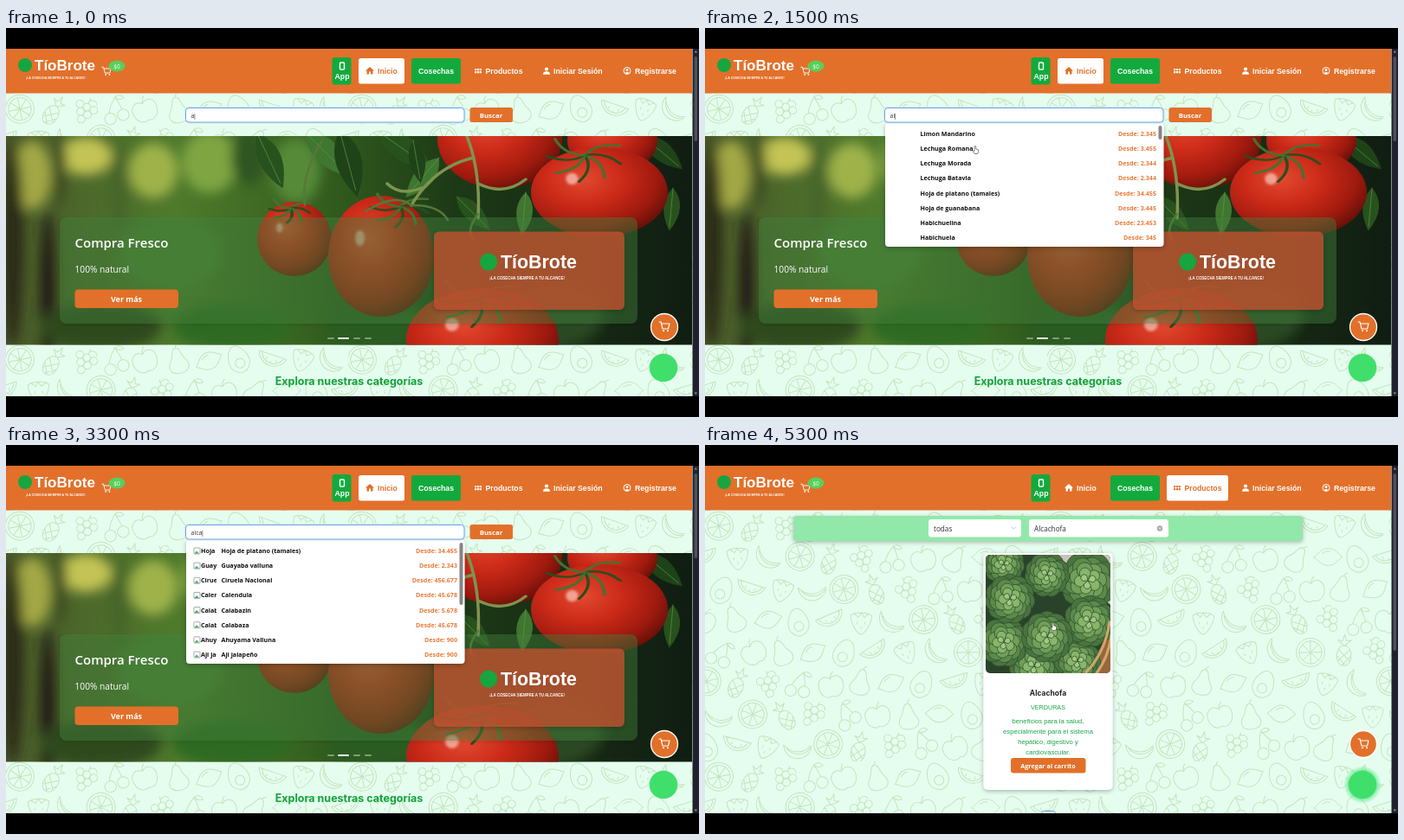
Animation, 800 px wide and 450 px high, one loop 5400 ms. Source, as an HTML page:

```html
<!DOCTYPE html>
<html lang="es">
<head>
<meta charset="utf-8">
<title>Tienda de frutas y verduras</title>
<style>
html, body { margin: 0; width: 100%; height: 100%; overflow: hidden; background: #000; }
svg { display: block; }
text { font-family: "Open Sans", "Noto Sans", sans-serif; white-space: pre; }
.b { font-weight: 700; }
.sb { font-weight: 600; }
.nav { font: 700 8.7px "Liberation Sans", Arial, sans-serif; }
.arial { font-family: "Liberation Sans", Arial, sans-serif; }
.head { font-family: Inter, sans-serif; font-weight: 700; }
.mid { text-anchor: middle; }
.end { text-anchor: end; }
.line { fill: none; stroke-linecap: round; stroke-linejoin: round; }
.pointer { animation: move 5.4s ease-in-out infinite; }
.glow { animation: glow 5.4s ease-in-out infinite; }
@keyframes move {
  0%, 72.2% { transform: translate(312px, 141px); }
  79.6%, 87% { transform: translate(364px, 128px); }
  96.3%, 100% { transform: translate(402px, 210px); }
}
@keyframes glow {
  0%, 29.6%, 59.3%, 88.9% { opacity: 0; }
  14.8%, 42%, 77%, 100% { opacity: 1; }
}
</style>
</head>
<body>
<svg width="800" height="450" viewBox="0 0 800 450">
  <defs>
    <linearGradient id="garden">
      <stop offset="0" stop-color="#4a5a2a"/><stop offset=".25" stop-color="#4f7a2c"/>
      <stop offset=".45" stop-color="#34601f"/><stop offset=".65" stop-color="#1d3a16"/>
      <stop offset="1" stop-color="#101d12"/>
    </linearGradient>
    <radialGradient id="red" cx=".38" cy=".35" r=".72">
      <stop offset="0" stop-color="#e2492f"/><stop offset=".4" stop-color="#cb2a18"/>
      <stop offset=".75" stop-color="#9f1a0e"/><stop offset="1" stop-color="#5c0f08"/>
    </radialGradient>
    <radialGradient id="halo">
      <stop offset=".7" stop-color="#4be67c" stop-opacity=".75"/>
      <stop offset="1" stop-color="#4be67c" stop-opacity="0"/>
    </radialGradient>
    <filter id="blur" x="-80%" y="-80%" width="260%" height="260%"><feGaussianBlur stdDeviation="7"/></filter>
    <filter id="soft" x="-50%" y="-50%" width="200%" height="200%"><feGaussianBlur stdDeviation="1.5"/></filter>
    <filter id="shade" x="-20%" y="-20%" width="140%" height="150%">
      <feDropShadow dx="0" dy="1.5" stdDeviation="2.5" flood-opacity=".28"/>
    </filter>
    <clipPath id="page"><rect y="24" width="800" height="402"/></clipPath>
    <clipPath id="hero"><rect y="125" width="792" height="241.500"/></clipPath>
    <clipPath id="alts"><rect x="216" y="112" width="27" height="140"/></clipPath>
    <clipPath id="cover"><rect x="324" y="127" width="144" height="137" rx="5"/></clipPath>
    <clipPath id="thumb"><rect x="216" y="116" width="27" height="18"/></clipPath>
  </defs>
</svg>
<script>
const LOOP = 5400;
const ORANGE = '#e2702a', GREEN = '#12aa3d';
const svg = document.querySelector('svg');
let css = '', count = 0;

const rect = (x, y, w, h, r, fill, more = '') =>
  `<rect x="${x}" y="${y}" width="${w}" height="${h}" rx="${r}" fill="${fill}" ${more}/>`;
const circle = (x, y, r, fill, more = '') =>
  `<circle cx="${x}" cy="${y}" r="${r}" fill="${fill}" ${more}/>`;
const oval = (x, y, rx, ry, fill, more = '') =>
  `<ellipse cx="${x}" cy="${y}" rx="${rx}" ry="${ry}" fill="${fill}" ${more}/>`;
const text = (x, y, s, size, fill, cls = '') =>
  `<text x="${x}" y="${y}" font-size="${size}" fill="${fill}" class="${cls}">${s}</text>`;
const line = (d, stroke, width = 1, more = '') =>
  `<path class="line" d="${d}" stroke="${stroke}" stroke-width="${width}" ${more}/>`;
const at = (x, y, body, more = '') => `<g transform="translate(${x} ${y}) ${more}">${body}</g>`;
const times = (n, fn) => Array.from({ length: n }, (_, i) => fn(i)).join('');

// Shows body only inside the given [from, to] spans of the loop, in ms.
function during(spans, body) {
  const id = 'w' + count++;
  const pct = ms => ms / LOOP * 100 + '%';
  css += `@keyframes ${id}{0%{opacity:0}${spans.map(([a, b]) =>
    `${pct(a)}{opacity:1}${pct(b)}{opacity:0}`).join('')}}`;
  return `<g style="animation:${id} ${LOOP}ms step-end infinite">${body}</g>`;
}

function random(seed) {
  return () => (seed = seed * 16807 % 2147483647) / 2147483647;
}

// Wallpaper of outlined fruit
const ring = (x, y, r) => `M${x - r} ${y}a${r} ${r} 0 1 0 ${2 * r} 0a${r} ${r} 0 1 0 ${-2 * r} 0`;
const fruits = [
  ring(0, 0, 15) + ring(0, 0, 12) + 'M-12 0H12M0-12V12M-8-8L8 8M8-8L-8 8',
  'M0-6C-6-12-14-7-13 2C-12 11-5 15 0 12C5 15 12 11 13 2C14-7 6-12 0-6ZM0-6q1-5 4-7',
  'M-15-6A15.5 15.5 0 0 0 15-6ZM-12-6A12.5 12.5 0 0 0 12-6M-5-2v2M0 1v2M5-2v2',
  'M0-5C10-5 10 16 0 16S-10-5 0-5ZM-6-1L6 11M6-1L-6 11M-7 6L1 15M7 6L-1 15M0-5L-7-11-2-10 0-17 2-10 7-11Z',
  'M0-13C5-13 4-5 7-1C14 8 9 14 0 14S-14 8-7-1C-4-5-5-13 0-13ZM0-13q1-3 3-4',
  'M-11-6C-11 3-4 13 0 14C4 13 11 3 11-6C6-10-6-10-11-6ZM-8-8L-3-4 0-9 3-4 8-8M-4 1v2M4 1v2M0 6v2',
  ring(-8, -4, 4) + ring(0, -4, 4) + ring(8, -4, 4) + ring(-4, 3, 4) + ring(4, 3, 4) + ring(0, 10, 4) + 'M0-8V-14M0-11q6-5 9 1',
  'M-15 0C-10-3-8-9 0-9S10-3 15 0C10 3 8 9 0 9S-10 3-15 0ZM-6-4q4-3 8-2',
  'M-12-9C-8 4 2 9 13 5C12 12-2 16-10 7C-14 2-14-4-12-9ZM-11-4C-8 6 2 12 12 7',
  ring(-6, 8, 6) + ring(8, 7, 6) + 'M-6 2Q-3-6 4-13Q7-5 8 1M4-13q6-3 9 3q-6 2-9-3',
  'M0-14C7-14 13 0 10 8Q6 15 0 15T-10 8C-13 0-7-14 0-14Z' + ring(0, 5, 5)
];
function wallpaper() {
  const w = 395, h = 290, cols = 11, rows = 8, rnd = random(41);
  const art = times(cols * rows, i => {
    const col = i % cols, row = Math.floor(i / cols);
    const x = (col + .5 + row % 2 / 2) * w / cols + rnd() * 4 - 2;
    const y = (row + .5) * h / rows + rnd() * 4 - 2;
    const d = fruits[(col * 3 + row * 5) % fruits.length];
    const turn = `rotate(${rnd() * 70 - 35}) scale(1.1)`;
    const one = px => at(px, y, `<path d="${d}"/>`, turn);
    return one(x) + (x > w - 20 ? one(x - w) : '');
  });
  return `<pattern id="fruit" width="${w}" height="${h}" patternUnits="userSpaceOnUse" y="76">
    <g class="line" stroke="#c4e3bc" stroke-width=".9">${art}</g></pattern>`;
}

// Icons, drawn around their own centre
const cart = (s, color) => line('M-6-5H-4L-2 3H4.500L6-3H-3.500', color, 1.1, `transform="scale(${s})"`) +
  circle(-1 * s, 5.2 * s, s, color) + circle(4 * s, 5.2 * s, s, color);
const icons = {
  home: c => `<path fill="${c}" d="M0-4.500L5 0H3.500V4H1V1H-1V4H-3.500V0H-5Z"/>`,
  grid: c => times(6, i => rect(-4 + i % 3 * 2.9, i < 3 ? -2.5 : .6, 2.2, 2.2, .4, c)),
  user: c => circle(0, -2, 2.1, c) + `<path fill="${c}" d="M-4 4.200Q-4 .8 0 .8T4 4.200Z"/>`,
  login: c => circle(0, 0, 4, 'none', `stroke="${c}"`) + circle(0, -1, 1.5, c) +
    `<path fill="${c}" d="M-2.500 2.600Q0 .2 2.500 2.600Q0 4.400-2.500 2.600Z"/>`
};

function brand(x, y, scale) {
  return at(x, y, circle(8, 10, 8, '#17a53f') +
    text(19, 16, 'TíoBrote', 17, '#fff', 'b arial') +
    text(9, 26, '¡LA COSECHA SIEMPRE A TU ALCANCE!', 3.500, '#fff', 'b arial'), `scale(${scale})`);
}

function header(active) {
  const item = (x, w, iconX, labelX, icon, label) => {
    const c = label === active ? ORANGE : '#fff';
    return (label === active ? rect(x, 35, w, 29.500, 2.500, '#fff') : '') +
      at(iconX, 49.500, icons[icon](c)) + text(labelX, 53, label, 8.7, c, 'nav');
  };
  return rect(0, 24, 792, 51.500, 0, ORANGE) + brand(14, 33, 1) +
    at(116, 49.500, cart(.85, '#fff')) + oval(128, 44, 9.500, 6.500, '#58cf5b') +
    text(128, 46.500, '$0', 6.500, '#fff', 'mid') +
    rect(376.500, 34, 22, 31.500, 3, GREEN) +
    rect(385.500, 40, 5, 8, 1, 'none', 'stroke="#fff" stroke-width="1.400"') +
    text(388, 58.500, 'App', 8.7, '#fff', 'nav mid') +
    rect(468, 35, 57, 29.500, 2.500, GREEN) + text(496.500, 53, 'Cosechas', 8.7, '#fff', 'nav mid') +
    item(407, 53, 420, 429, 'home', 'Inicio') + item(533, 71, 545, 553.500, 'grid', 'Productos') +
    item(612, 84, 624, 632, 'user', 'Iniciar Sesión') + item(704, 77, 717, 726, 'login', 'Registrarse');
}

// Hero picture
const leaf = (x, y, len, turn, fill) => at(x, y,
  `<path fill="${fill}" d="M0 0Q${len * .4} ${-len * .4} ${len} 0Q${len * .4} ${len * .35} 0 0Z"/>` +
  line(`M0 0H${len * .9}`, '#6b9a45', .6), `rotate(${turn})`);
const calyx = (x, y, len) => at(x, y, times(7, i =>
  line(`M0 0Q${len * .5} ${-len * .25} ${len} ${len * .15}`, i % 2 ? '#2b4d1e' : '#48702f', 3.500,
    `transform="scale(1 .7) rotate(${i * 40 - 30})"`)));
const tomato = (x, y, rx, ry, capX) => oval(x, y, rx, ry, 'url(#red)') +
  oval(x - rx * .4, y - ry * .3, rx * .09, ry * .13, '#ffe3d8', 'opacity=".6" filter="url(#soft)"') +
  calyx(capX, y - ry * .82, rx * .55);

function garden() {
  const spots = [
    [30, 170, 22, 40, '#a3a845'], [92, 148, 30, 22, '#c3c454'], [170, 165, 28, 32, '#9fb24a'],
    [235, 155, 32, 36, '#7fa543'], [8, 250, 12, 120, '#2a2a17'], [48, 300, 9, 90, '#241f13'],
    [62, 165, 8, 45, '#3c4d22'], [130, 185, 12, 50, '#47662a'], [280, 150, 20, 32, '#2f5420'],
    [110, 345, 70, 28, '#2f4a1e'], [190, 260, 60, 40, '#4c8032'], [260, 345, 70, 26, '#2f6a22'],
    [335, 165, 28, 38, '#568a38'], [430, 345, 60, 28, '#2c5c20'], [630, 330, 60, 40, '#2b4a20']
  ];
  const leaves = [
    [290, 122, 70, 65], [345, 120, 75, 45], [385, 118, 80, 75], [430, 120, 75, 35], [500, 150, 60, 130],
    [470, 130, 50, 80], [520, 195, 55, 45], [600, 190, 50, 95], [735, 125, 60, 40], [770, 185, 50, 95]
  ];
  return `<g clip-path="url(#hero)">` + rect(0, 125, 792, 242, 0, 'url(#garden)') +
    `<g filter="url(#blur)">${spots.map(s => oval(...s)).join('')}</g>` +
    leaves.map(([x, y, len, turn], i) => leaf(x, y, len, turn, ['#28521d', '#3f7630', '#1e4318'][i % 3])).join('') +
    tomato(570, 128, 72, 58, 560) + tomato(700, 130, 52, 38, 700) + tomato(685, 190, 79, 52, 668) +
    tomato(333, 244, 43, 43, 328) + tomato(550, 361, 88, 60, 545) + tomato(433, 264, 61, 70, 455) +
    line('M532 125Q548 165 545 220M540 150Q495 160 468 205M545 180Q575 195 600 175M480 185Q455 195 440 180', '#7d9450', 3.500) +
    line('M468 205Q450 190 415 212M470 205Q500 205 510 222M545 215Q530 235 540 245M345 205Q340 170 365 130', '#56783a', 2.500) + '</g>';
}

function hero() {
  return garden() +
    rect(62, 219, 667, 123, 8, 'rgba(72,132,62,.4)', 'filter="url(#shade)"') +
    rect(494, 235.500, 220, 90.500, 6, 'rgba(190,82,48,.8)', 'filter="url(#shade)"') +
    brand(547, 258, 1.26) +
    text(79.500, 254, 'Compra Fresco', 15, '#fff', 'sb') +
    text(79.500, 283, '100% natural', 10.2, '#fff') +
    rect(79.500, 302.500, 119.500, 21.500, 4, ORANGE) + text(139, 316.500, 'Ver más', 9, '#fff', 'b mid') +
    [371, 401, 414].map(x => rect(x, 358, 8, 2, 1, '#fff', 'opacity=".4"')).join('') +
    rect(383, 358, 13, 2, 1, '#fff');
}

// Search box and its suggestions
const typed = [
  ['a', 0, 1350, [[0, 500], [1030, 1350]]],
  ['al', 1350, 2500, [[1350, 1880], [2410, 2500]]],
  ['alc', 2500, 2900, [[2500, 2900]]],
  ['alca', 2900, 4700, [[2900, 3430], [3960, 4490]]]
];
function typing() {
  return typed.map(([s, from, to, blinks]) =>
    during([[from, to]], text(213.500, 103.500, s, 7, '#333')) +
    during(blinks, text(213.500, 103.500, `<tspan fill-opacity="0">${s}</tspan><tspan dx="-1.3">|</tspan>`, 7, '#222'))
  ).join('');
}

const suggestion = (name, price, y) => text(248.500, y, name, 7.15, '#111', 'b') +
  text(521, y, 'Desde: ' + price, 7.15, '#e87b38', 'b end');
const broken = (name, y) => at(217, y - 6, rect(0, 0, 7, 7, .5, '#fff', 'stroke="#8b97a5" stroke-width=".8"') +
  `<path fill="#4caf50" d="M.5 6.500L3 3.500L6 6.500Z"/>`) + text(225, y, name, 7.15, '#111', 'b');
const box = h => rect(208, 110, 321.500, h, 4, '#fff', 'filter="url(#shade)"');

function list(rows, from, loaded, to, thumb) {
  const y = i => 125 + i * 17.15;
  return during([[from, to]], box(143) + rows.map(([n, p], i) => suggestion(n, p, y(i))).join('') +
    rect(523.500, 113, 4, thumb, 2, '#858585')) +
    during([[loaded, to]], `<g clip-path="url(#alts)">${rows.map(([n], i) => broken(n, y(i))).join('')}</g>`);
}

const listA = [
  ['Limon Mandarino', '2.345'], ['Lechuga Romana', '3.455'], ['Lechuga Morada', '2.344'],
  ['Lechuga Batavia', '2.344'], ['Hoja de platano (tamales)', '34.455'], ['Hoja de guanabana', '3.445'],
  ['Habichuelina', '23.453'], ['Habichuela', '345']
];
const listAl = [
  ['Hoja de platano (tamales)', '34.455'], ['Guayaba valluna', '2.343'], ['Ciruela Nacional', '456.677'],
  ['Calendula', '45.678'], ['Calabazin', '5.678'], ['Calabaza', '45.678'],
  ['Ahuyama Valluna', '900'], ['Aji jalapeño', '900']
];

// Artichokes: rings of overlapping leaves
function artichoke(x, y, r) {
  const tones = ['#4a7340', '#5c8a4c', '#719f5a', '#89b56c', '#a3c983'];
  const rings = tones.map((tone, k) => {
    const reach = r * (1 - k * .18), n = 11 - k * 2, s = reach * .42;
    return times(n, i => `<path transform="rotate(${i * 360 / n + k * 17})" fill="${tone}" stroke="#2c4f29"
      stroke-width=".7" d="M0 0L${-s} ${-reach * .5}Q${-s} ${-reach * .95} 0 ${-reach}Q${s} ${-reach * .95} ${s} ${-reach * .5}Z"/>`);
  });
  return at(x, y, rings.join(''));
}
function artichokes() {
  const heads = [[345, 138, 24], [442, 157, 34], [380, 256, 29], [430, 250, 27], [444, 204, 30],
    [395, 150, 26], [345, 228, 29], [352, 178, 29], [395, 222, 30]];
  return rect(324, 127, 144, 137, 0, '#29432a') +
    `<path fill="#c9c3bd" d="M405 127H468V185Z"/><path fill="#96683a" d="M468 190Q465 240 430 264H468Z"/>` +
    heads.map(h => artichoke(...h)).join('') +
    line('M467 205Q462 240 440 263M469 220Q466 245 452 264', '#d3a66a', 3);
}

function home() {
  return header('Inicio') + hero() +
    text(396, 412.500, 'Explora nuestras categorías', 12.5, '#12a23a', 'head mid') +
    list(listA, 1300, 1700, 2400, 16) + list(listAl, 2400, 2700, 3800, 72) +
    during([[3800, 4700]], box(29) + suggestion('Alcachofa', '6.000', 128)) +
    during([[4200, 4700]], rect(209, 113, 320, 24.500, 2, '#f1f1f1') + suggestion('Alcachofa', '6.000', 128)) +
    during([[4100, 4700]], `<g clip-path="url(#thumb)">${at(216, 112, '<use href="#harvest" x="-324" y="-127"/>', 'scale(.1875)')}</g>`) +
    rect(207.500, 92.500, 321.500, 16.500, 3.500, '#fff', 'stroke="#d3e8f6" stroke-width="3"') +
    rect(207.500, 92.500, 321.500, 16.500, 3.500, '#fff', 'stroke="#6fa8dc"') + typing() +
    rect(535.500, 92, 49.500, 17, 2.500, ORANGE) + text(560, 103.500, 'Buscar', 7.8, '#fff', 'b mid');
}

function shop() {
  const about = ['beneficios para la salud,', 'especialmente para el sistema', 'hepático, digestivo y', 'cardiovascular.'];
  return header('Productos') +
    rect(102, 82, 588, 29, 3, '#92e8a8', 'filter="url(#shade)"') +
    rect(258, 86, 107, 20.500, 3, '#fff') + text(264, 99.500, 'todas', 8.2, '#333') +
    line('M354 95L356.300 97.300L358.600 95', '#bbb', .8) +
    rect(374, 86, 161, 20.500, 3, '#fff') + text(380, 99.500, 'Alcachofa', 8.2, '#333') +
    circle(525, 96.500, 3.2, '#a9a9a9') + line('M524 95.500l2 2m0-2l-2 2', '#fff', .7) +
    rect(321.500, 125, 149, 274, 5, '#fff', 'filter="url(#shade)"') +
    `<g clip-path="url(#cover)"><use href="#harvest"/></g>` +
    text(396, 289.500, 'Alcachofa', 8.500, '#222', 'head mid') +
    text(396, 305.500, 'VERDURAS', 7.2, '#1aa54a', 'arial mid') +
    about.map((s, i) => text(396, 322 + i * 12, s, 7.7, '#1aa54a', 'arial mid')).join('') +
    rect(353, 362, 86.500, 17.500, 3, ORANGE) + text(396, 373.500, 'Agregar al carrito', 7.3, '#fff', 'b mid') +
    rect(388.500, 423.500, 16, 16, 3, '#fff', 'stroke="#5b9bd5"');
}

function floating() {
  return circle(760, 346, 15.500, ORANGE, 'stroke="#fff" stroke-width="1.300"') + at(760, 345, cart(1, '#fff')) +
    `<g class="glow">${circle(759, 393, 22, 'url(#halo)')}</g>` + circle(759, 393, 16.300, '#40df6c');
}

const scrollbar = end => rect(792.500, 24, 7.500, 402, 0, '#20212f') +
  rect(794.500, 33, 3.500, end - 33, 1.700, '#50515d') +
  `<path fill="#888994" d="M796.300 26l1.800 2.500h-3.600ZM796.300 424l1.800-2.500h-3.600Z"/>`;

const arrow = '<path fill="#fff" stroke="#222" stroke-width=".6" d="M0-3V4L1.600 2.600L2.600 5L3.600 4.500L2.600 2.300H4.600Z"/>';
const hand = '<path fill="#fff" stroke="#333" stroke-width=".6" d="M-1-4Q0-5 .8-4V-1L3.600 0V2.500L2.800 4.500H-.8L-3 1.300Q-2.600 .2-1 1.400Z"/>';

svg.querySelector('defs').innerHTML += wallpaper() + `<g id="harvest">${artichokes()}</g>`;
svg.innerHTML += `<g clip-path="url(#page)">` +
  rect(0, 24, 793, 402, 0, '#e5fdef') + rect(0, 75, 793, 351, 0, 'url(#fruit)') +
  during([[0, 4700]], home() + scrollbar(131)) +
  during([[4700, LOOP]], shop() + scrollbar(238)) +
  floating() +
  `<g class="pointer">${during([[600, 1300]], arrow)}${during([[1300, 2500], [3900, LOOP]], hand)}</g></g>`;

const style = document.createElement('style');
style.textContent = css;
document.head.append(style);
</script>
</body>
</html>
```
